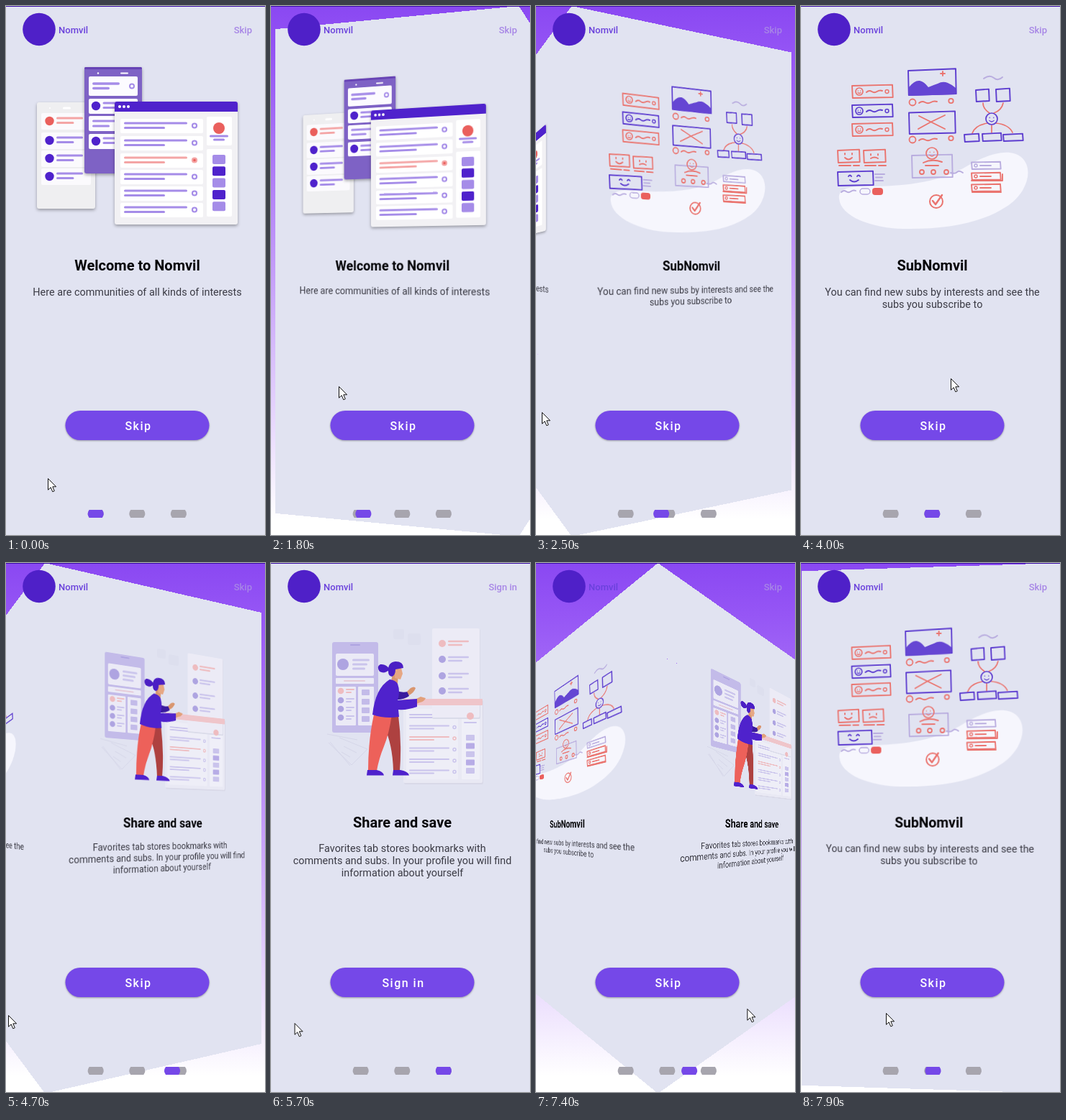
An HTML page that plays this animation: 360 px wide and 736 px high, repeating every 8000 ms.

```html
<!DOCTYPE html>
<html lang="en">
<head>
<meta charset="utf-8">
<title>Onboarding</title>
<style>
html, body { margin: 0; width: 100%; height: 100%; overflow: hidden; }
body { position: relative; background: linear-gradient(#8a48f2, #9656f5 10%, #c49df9 50%, #f3ebfe 88%, #fff 97%); }
svg { position: absolute; left: 0; top: 0; width: 365px; height: 738px; font-family: Roboto, sans-serif; }
.page { left: -3px; width: 371px; background: #e1e3f1; }
.title { font-size: 20px; font-weight: 700; fill: #050508; text-anchor: middle; }
.body { font-size: 14.4px; fill: #3b3b45; text-anchor: middle; }
.head { font-size: 13px; font-weight: 500; }
.label { font-size: 16px; font-weight: 500; letter-spacing: 1.5px; fill: #fff; text-anchor: middle; }
.sketch { fill: none; stroke-linecap: round; stroke-linejoin: round; }
.raised { filter: drop-shadow(0 2px 2px #0005); }
.button { filter: drop-shadow(0 1px 1.2px #0005); }
</style>
</head>
<body>
<script>
const LOOP = 8000, STEP = 100, W = 371;
const TURN = 30, DEPTH = 130;
const DARK = '#4f22cc', MID = '#a58ce8', RED = '#ea605d', PINK = '#f4a5a5';
const PEN = '#5d3dcf', CORAL = '#ea746f', PALE = '#b9addf';

const rect = (x, y, w, h, fill, r = 0) =>
  `<rect x="${x}" y="${y}" width="${w}" height="${h}" rx="${r}" fill="${fill}"/>`;
const dot = (x, y, r, fill) => `<circle cx="${x}" cy="${y}" r="${r}" fill="${fill}"/>`;
const shape = (d, fill) => `<path d="${d}" fill="${fill}"/>`;
const bar = (x, y, w, fill, h = 3) => rect(x, y - h / 2, w, h, fill, h / 2);
const pen = (d, c, w = 1.9) => `<path d="${d}" fill="none" stroke="${c}" stroke-width="${w}"/>`;
const ring = (x, y, r, c, w = 1.5) =>
  `<circle cx="${x}" cy="${y}" r="${r}" fill="none" stroke="${c}" stroke-width="${w}"/>`;
const each = (list, fn) => list.map(fn).join('');

// Slightly crooked hand-drawn box
const box = (x, y, w, h, c, k = 1) =>
  pen(`M${x} ${y + k}L${x + w} ${y - k * .4}L${x + w + .7} ${y + h - k}L${x + .8} ${y + h}Z`, c);
const wave = (x, y, w, c) => {
  const q = w / 6;
  return pen(`M${x} ${y + 1}q${q} -3.5 ${2 * q} -1t${2 * q} 0t${2 * q} -1`, c);
};
const face = (x, y, r, c) => ring(x, y, r, c, 1.7) +
  pen(`M${x - r * .35} ${y - r * .25}v.6M${x + r * .35} ${y - r * .25}v.6M${x - r * .4} ${y + r * .3}q${r * .4} ${r * .4} ${r * .8} 0`, c, 1.2);

const copy = (title, lines, y = 403) => `<text class="title" x="182.5" y="368">${title}</text>` +
  each(lines, (s, i) => `<text class="body" x="182.5" y="${y + i * 17}">${s}</text>`);

function windows() {
  const row = (x, y, red, w) => dot(x, y, 6.2, red ? RED : DARK) +
    bar(x + 9.5, y - 4, w, red ? PINK : MID) + bar(x + 9.5, y + 2.5, w * .66, red ? PINK : MID);
  const light = rect(43, 134, 81, 148, '#efeff1', 3) + bar(79, 142, 11, '#fff') + dot(61, 142, 1, '#fff') +
    each([160, 187, 212, 237], (y, i) => rect(49, y - 11, 69, 23, '#fbfafd', 2) + row(60.5, y, !i, 37));
  const violet = rect(109, 85, 80, 148, '#7e62c5', 3) + rect(109, 85, 80, 3, '#6743b5', 1.5) +
    bar(159, 93.5, 11, '#fff', 2) + dot(128, 93.5, 1.2, '#fff') +
    rect(115, 98, 68, 27, '#fcfbff', 2) + bar(120, 108, 38, MID, 3.5) + bar(120, 114.5, 24, MID, 3.5) + ring(175, 111.5, 3, MID, 2) +
    each([129, 153, 178], y => rect(115, y, 68, 21, '#fcfbff', 2)) +
    row(125, 139, false, 37) + row(125, 188, false, 37) +
    bar(120, 160, 38, MID) + bar(120, 167, 24, MID);
  const browser = rect(151, 133, 171, 171, '#f2f1f4', 3) + shape('M151 147v-11q0-3 3-3h165q3 0 3 3v11z', DARK) +
    each([158, 164, 170], x => dot(x, 140, 2, '#fff')) +
    each([167, 191, 215, 238, 261, 284], (y, i) => {
      const c = i == 2 ? PINK : MID;
      return rect(159, y - 10, 115, 20, '#fff', 2) + bar(164, y - 4, 88, c) + bar(164, y + 2.5, 57, c) +
        ring(262, y - .5, 3, c, 2.2) + (i == 2 ? dot(262, y - .5, 2, RED) : '');
    }) +
    rect(279, 154, 35, 40, '#fff', 2) + dot(296, 170, 8, RED) + bar(283, 181, 26, MID) + bar(288, 186, 16, MID) +
    rect(279, 199, 35, 94, '#fff', 2) +
    each([0, 1, 2, 3, 4], i => rect(287, 207 + i * 16.3, 18, 13, i % 2 ? DARK : MID, 2));
  return each([light, violet, browser], g => `<g class="raised">${g}</g>`);
}

function sketches() {
  const post = (y, c) => box(71, y, 56, 18, c) + face(81, y + 9, 5, c) + wave(91, y + 9, 22, c) + ring(119.5, y + 9, 2.4, c);
  const under = y => ring(155, y, 4.5, CORAL, 1.8) + wave(164, y, 25, CORAL) + ring(208.5, y - 2, 3.2, CORAL, 1.8);
  const list = (y, c) => box(237, y, 40, 10, c, .5) + ring(243, y + 5, 2, c) + pen(`M249 ${y + 5}h15`, c);
  const smile = (x, y, c, bend) => pen(`M${x - 5} ${y - 4}v1.5M${x + 5} ${y - 4}v1.5M${x - 5} ${y + 2}q5 ${bend} 10 0`, c);
  return shape('M53 268C51 255 66 250 92 251C150 251 196 244 232 222C258 207 290 196 307 211C325 228 313 263 284 280C247 304 195 311 142 310C98 309 55 293 53 268Z', '#f6f6fd') +
    '<g class="sketch">' +
    post(110, CORAL) + post(137, PEN) + post(163, CORAL) +
    box(149, 88, 66, 36, PEN, 2) + shape('M150 113Q158 103 165 104Q171 105 177 113Q184 110 190 108Q197 104 204 107Q211 110 215 114V123L150 125Z', '#6546d3') +
    pen('M197 91v6M194 94h6', CORAL) + under(134) +
    box(150, 147, 64, 31, PEN, 1.5) + pen('M164 153Q180 161 200 171M200 152Q180 161 163 171', CORAL) + under(186) +
    pen('M254 101q8-6 14-1t12-1', PALE) +
    box(243, 116, 18, 17, PEN) + box(271, 115, 19, 18, PEN) +
    pen('M253 135Q253 143 262 149M281 135Q279 145 268 149M259 163Q242 166 238 177M265 166V176M271 163Q289 165 294 176', CORAL, 1.7) +
    face(265, 157, 8, PEN) + box(227, 178, 20, 11, PEN) + box(252, 177, 26, 11, PEN) + box(281, 178, 27, 10, PEN) +
    box(51, 200, 30, 18, CORAL) + smile(66, 209, CORAL, 5) + box(87, 200, 30, 18, CORAL) + smile(102, 210, CORAL, -3) +
    pen('M53 222h16M73 222h8M89 222h15M108 222h10', CORAL) +
    box(51, 230, 49, 20, PEN) + pen('M66 237q2-3 4 0M78 237q2-3 4 0M68 242q6 5 12 0', PEN) +
    pen('M103 234h13M104 238.5h9M103 243h11', PALE) + wave(56, 258, 20, PALE) +
    `<rect x="82" y="254" width="14" height="8" rx="4" stroke="${PALE}" stroke-width="1.5"/>` + rect(99, 253, 15, 10, RED, 4) +
    box(154, 207, 56, 32, PALE) + face(182, 205, 8, CORAL) + pen('M170 218q12-6 26-1M173 222h18', CORAL) +
    each([168, 184, 202], x => ring(x, 231, 3, CORAL, 1.8)) + pen('M208 232q6 2 9-1t8 1', PALE) +
    list(217, PALE) + list(232, CORAL) + list(248, CORAL) +
    pen('M237 243h43v-9M238 259h40', CORAL) +
    ring(188, 272, 9, CORAL, 2) + pen('M183 271l4 5 9-13', CORAL, 2.5) + '</g>';
}

function person() {
  const soft = '#c3bbe9', tint = '#cac4ec', blush = '#eebcc0', paper = '#ebeaf6', plum = '#aea4e1';
  return pen('M78 238L120 246M82 249L110 282M95 243L134 259L112 281L80 250M101 255l18 9M98 263l12 7', '#d5d6e8', 1) +
    rect(170, 92, 15, 14, '#dddfee', 3) + rect(190, 98, 18, 16, '#dddfee', 3) +
    rect(85, 110, 64, 126, soft, 3) + bar(110, 114, 14, plum, 2) + rect(90, 126, 53, 31, paper, 2) + dot(100, 141, 8, plum) +
    each([135, 141, 147], (y, i) => bar(113, y, 24 - i * 3, tint)) +
    rect(90, 160, 53, 8, paper, 1) + bar(101, 164, 30, '#e6cbd8', 2) + rect(90, 172, 28, 54, paper, 1) + rect(121, 172, 22, 54, paper, 1) +
    each([178, 191, 203, 215], (y, i) => dot(97, y, 4.3, i ? plum : blush) + bar(104, y - 2, 12, i ? tint : blush, 2) +
      bar(104, y + 2, 8, i ? tint : blush, 2) + rect(126, y - 2, 11, 8, soft, 1)) +
    rect(185, 191, 110, 117, '#d9d9e8', 2) + rect(184, 190, 110, 116, '#e9e9f4', 2) +
    rect(188, 203, 72, 98, '#eeeef7', 1) + rect(265, 203, 25, 98, '#efeff8', 1) +
    each([0, 1, 2, 3, 4, 5], i => {
      const y = 213 + i * 15.5, c = i == 2 ? blush : tint;
      return bar(192, y - 2, 56, c, 2) + bar(192, y + 2, 35, c, 2) + ring(255, y, 2, c);
    }) +
    rect(224, 92, 67, 125, '#dadbe9', 2) + rect(224, 91, 66, 124, '#ecebf6', 2) +
    each([112, 134, 157, 178], (y, i) => dot(238, y, 5, i ? plum : blush) + bar(246, y - 3, 29, i ? tint : blush, 2.5) + bar(246, y + 2, 20, i ? tint : blush, 2.5)) +
    rect(184, 189, 110, 9, '#efc5ca', 1) +
    dot(277, 213, 5, blush) + bar(268, 222, 18, tint, 2) +
    each([0, 1, 2, 3, 4], i => rect(271, 239 + i * 11.5, 12, 8, i % 2 ? '#b7ace6' : tint, 1)) +
    // Figure
    shape('M173 177Q181 181 190 179L192 185Q184 191 172 190Z', '#3a1a9e') + shape('M189 179L194 174Q199 171 201 174Q199 180 192 184Z', '#d9966f') +
    shape('M157 212H177Q182 250 179 289H170Q169 252 157 227Z', '#ae4140') +
    shape('M143 211H168Q164 238 157 255Q150 272 147 289H135Q135 247 143 211Z', '#ed615a') +
    shape('M134 288H147Q156 290 157 295.5H133Z', DARK) + shape('M170 288H180Q191 290 192 295.5H169Z', DARK) +
    shape('M169 153H177L176 168L167 165Z', '#d9966f') + shape('M172 146H181L183 154L180 162L172 160Z', '#e6a783') +
    shape('M202 189L208 186L215 188Q213 193 207 194L202 196Z', '#e2a07b') +
    shape('M165 162Q173 163 176 168Q180 179 176 191L203 189V200Q189 205 177 204L178 214Q158 217 141 211Q145 174 165 162Z', DARK) +
    shape('M163 151Q162 138 173 137Q184 137 184 146L173 148Q173 156 168 158Q163 157 163 151ZM165 148Q158 155 151 151Q146 144 152 141Q160 140 165 148Z', '#4b1fc4');
}

const cells = [
  copy('Welcome to Nomvil', ['Here are communities of all kinds of interests']) + windows(),
  copy('SubNomvil', ['You can find new subs by interests and see the', 'subs you subscribe to']) + sketches(),
  copy('Share and save', ['Favorites tab stores bookmarks with', 'comments and subs. In your profile you will find', 'information about yourself'], 402) + person()
];

const pill = 'M-9 -5.5H9Q13 0 9 5.5H-9Q-13 0 -9 -5.5Z';
const dotX = i => 124.7 + 57.6 * i;

document.body.innerHTML = each(cells, c => `<svg class="page" viewBox="-3 0 371 738">${c}</svg>`) + `<svg>
  ${rect(0, 0, 365, 1, '#3b0fa6')}
  ${dot(46, 32.5, 22.8, '#4f20c8')}
  <text class="head" x="73" y="38" fill="#6a41dc">Nomvil</text>
  <text class="head" id="action" x="342" y="38" fill="#a786e6" text-anchor="end"></text>
  <g class="button">${rect(82.5, 563, 200, 41, '#7548e8', 20.5)}</g>
  <text class="label" id="label" x="184" y="590"></text>
  ${each([0, 1, 2], i => `<path d="${pill}" fill="#a7a5ae" transform="translate(${dotX(i)} 706.5)"/>`)}
  <path id="active" d="${pill}" fill="#7548e8"/>
  <path id="cursor" d="M.5 .5V16.2L4.2 12.8L6.8 18.8L9.3 17.7L6.8 11.8H11.6Z" fill="#fff" stroke="#111"/>
</svg>`;

const $ = id => document.getElementById(id);
const pages = [...document.querySelectorAll('.page')];

// [time, page position]
const scroll = [[1700, 0], [1800, .064], [2000, .24], [2250, .43], [2500, .858], [2700, .97], [2900, 1],
  [4050, 1], [4200, 1.1], [4450, 1.43], [4700, 1.846], [4900, 1.965], [5150, 2],
  [7050, 2], [7150, 1.93], [7300, 1.72], [7500, 1.35], [7700, 1.1], [7900, 1.021]];
// [time, x, y]
const pointer = [[300, 58, 657], [800, 150, 590], [1200, 240, 545], [1550, 240, 535], [1800, 94, 529], [2000, 8, 565],
  [2700, 8, 565], [3200, 230, 595], [3300, 286, 588], [3500, 286, 588], [3700, 248, 518], [3900, 248, 518],
  [4000, 208, 518], [4250, 60, 590], [4400, 3, 629], [4800, 3, 629], [5400, 32, 640], [6500, 34, 640],
  [7000, 144, 629], [7200, 300, 620], [7500, 290, 620], [7900, 118, 626]];

function at(keys, t) {
  const n = keys.findIndex(k => k[0] > t);
  if (n < 1) return (n ? keys[keys.length - 1] : keys[0]).slice(1);
  const a = keys[n - 1], b = keys[n], f = (t - a[0]) / (b[0] - a[0]);
  return a.slice(1).map((v, i) => v + (b[i + 1] - v) * f);
}

function draw(t) {
  const [pos] = at(scroll, t), [x, y] = at(pointer, t);
  pages.forEach((page, i) => {
    const off = i - pos;
    page.style.visibility = Math.abs(off) < 1 ? 'visible' : 'hidden';
    page.style.transformOrigin = off < 0 ? '100% 50%' : '0 50%';
    page.style.transform = off ? `translateX(${W * off}px) perspective(${DEPTH}px) rotateY(${TURN * off}deg)` : 'none';
  });
  $('action').textContent = $('label').textContent = pos < 2 ? 'Skip' : 'Sign in';
  $('active').setAttribute('transform', `translate(${dotX(pos)} 706.5)`);
  $('cursor').setAttribute('transform', `translate(${x} ${y})`);
}

const start = performance.now();
function tick() {
  const t = (performance.now() - start) % LOOP;
  draw(Math.floor(t / STEP) * STEP);
  requestAnimationFrame(tick);
}
tick();
</script>
</body>
</html>
```
